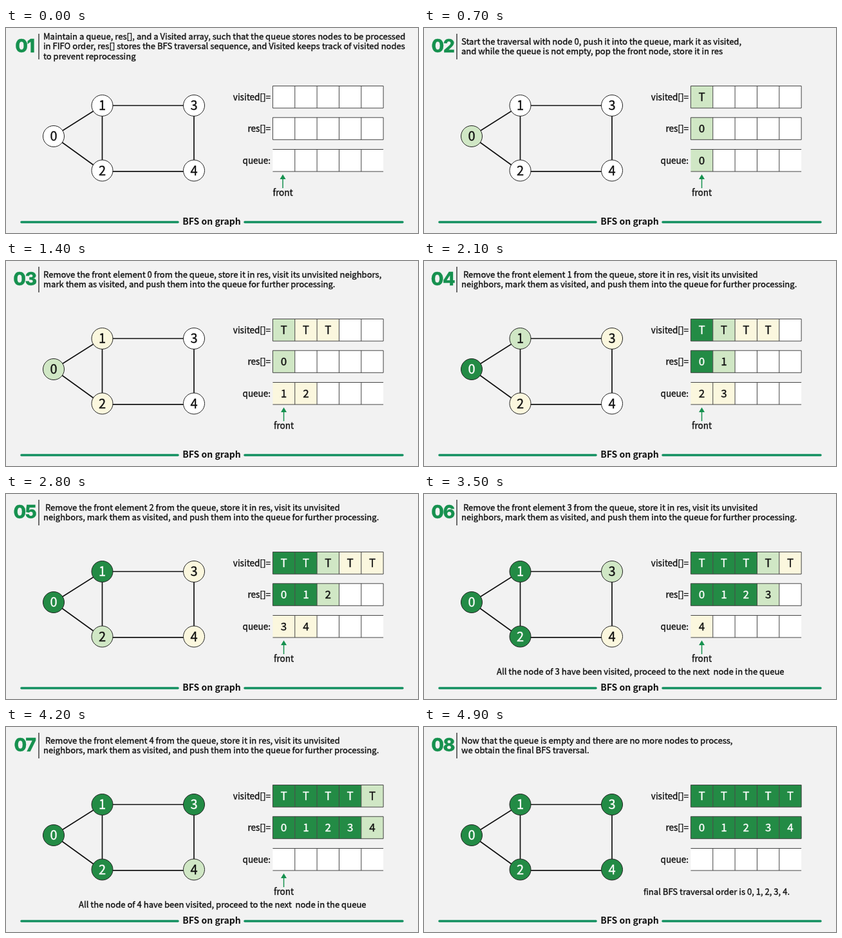
Write an HTML page that moves like this. It is 640x320 px and loops after 5.6 s.

```html
<!DOCTYPE html>
<html lang="en">
<head>
<meta charset="utf-8">
<title>BFS on graph</title>
<style>
  html, body { margin: 0; width: 100%; height: 100%; overflow: hidden; background: #f2f2f2; }
  svg { display: block; width: 640px; height: 320px; }
  text {
    font: 500 13.07px "Noto Sans CJK SC", "Noto Sans CJK JP", "Noto Sans", sans-serif;
    color: #111; fill: currentColor; stroke: currentColor; stroke-width: .35px; white-space: pre;
  }
  .step { font: 800 28.5px Inter, sans-serif; letter-spacing: -1.5px; color: #16914f; }
  .name { font-size: 13.5px; }
  .num { font-size: 20px; }
  .cell { font-size: 17px; }
  .title { font-size: 14px; font-weight: 700; stroke: none; }
  .done { color: #fff; }
</style>
</head>
<body>
<svg id="stage" viewBox="0 0 640 320"></svg>
<script>
const STEP_MS = 700, CELL = 34.35, LEFT = 414.4, HEIGHT = 34.5;
const INK = '#222', RULE = '#444', GREEN = '#16914f';
const FILL = { none: '#fff', seen: '#fbf7de', current: '#d0e7c5', done: '#238b45' };
const NODES = [[74, 169], [149.5, 121], [149.5, 222.5], [292, 121], [292, 222.5]];
const EDGES = 'M74 169L149.5 121V223.8ZM149.5 121H292V223.8H149.5';

const remove = n => [
  ` Remove the front element ${n} from the queue, store it in res, visit its unvisited`,
  'neighbors, mark them as visited, and push them into the queue for further processing.'];
const allVisited = n => `All the node of ${n} have been visited, proceed to the next  node in the queue`;

// current: node being processed; seen: how many nodes are marked visited
const STEPS = [
  { current: -1, seen: 0, lines: [
    'Maintain a queue, res[], and a Visited array, such that the queue stores nodes to be processed',
    'in FIFO order, res[] stores the BFS traversal sequence, and Visited keeps track of visited nodes',
    'to prevent reprocessing'] },
  { current: 0, seen: 1, queue: [0], lines: [
    'Start the traversal with node 0, push it into the queue, mark it as visited,',
    'and while the queue is not empty, pop the front node, store it in res'] },
  { current: 0, seen: 3, lines: [
    'Remove the front element 0 from the queue, store it in res, visit its unvisited neighbors,',
    'mark them as visited, and push them into the queue for further processing.'] },
  { current: 1, seen: 4, lines: remove(1) },
  { current: 2, seen: 5, lines: remove(2) },
  { current: 3, seen: 5, lines: remove(3), note: allVisited(3) },
  { current: 4, seen: 5, lines: remove(4), note: allVisited(4) },
  { current: 5, seen: 5, lines: [
    'Now that the queue is empty and there are no more nodes to process,',
    'we obtain the final BFS traversal.'] }
];

const text = (x, y, s, cls = '', anchor = 'start') =>
  `<text x="${x}" y="${y}" class="${cls}" text-anchor="${anchor}">${s}</text>`;
const label = (x, y, s, cls) => text(x, y, s, cls, 'middle');
const path = (d, color = RULE, width = 1, cap = 'butt') =>
  `<path d="${d}" fill="none" stroke="${color}" stroke-width="${width}" stroke-linecap="${cap}"/>`;

function row(y, name, cells, open) {
  let out = text(411, y + 22, name, 'name', 'end');
  for (let i = 0; i < 5; i++) {
    const [s, state] = cells[i] || ['', 'none'], x = LEFT + i * CELL;
    out += `<rect x="${x}" y="${y}" width="${CELL}" height="${HEIGHT}" fill="${FILL[state]}"/>`;
    out += label(x + CELL / 2, y + 23.3, s, 'cell ' + state);
  }
  for (let i = open ? 1 : 0; i <= (open ? 4 : 5); i++)
    out += path(`M${LEFT + i * CELL} ${y}v${HEIGHT}`);
  return out + path(`M${LEFT} ${y}h${5 * CELL}m0 ${HEIGHT}h${-5 * CELL}`);
}

function scene(index) {
  const { current, seen, lines, note, queue } = STEPS[index];
  const state = i => i < current ? 'done' : i === current ? 'current' : i < seen ? 'seen' : 'none';
  const ids = [0, 1, 2, 3, 4];
  const cells = list => list.map(i => [i, state(i)]);
  const waiting = queue || ids.slice(current + 1, seen);
  const top = lines.length > 2 ? 18 : 25.6;

  let out = label(29, 38, '0' + (index + 1), 'step') + path('M51 9V49', INK, 1.3);
  lines.forEach((s, i) => out += text(58, top + i * 15.4, s));

  out += path(EDGES, '#111', 1.7);
  NODES.forEach(([x, y], i) => {
    out += `<circle cx="${x}" cy="${y}" r="16.5" fill="${FILL[state(i)]}" stroke="${INK}"/>`;
    out += label(x, y + 7.2, i, 'num ' + state(i));
  });

  out += row(90.5, 'visited[]=', ids.slice(0, seen).map(i => ['T', state(i)]));
  out += row(139.8, 'res[]=', cells(ids.slice(0, current + 1)));
  out += row(189.5, 'queue:', cells(waiting), true);

  if (index < 7) {
    const x = index ? 431.5 : 430;
    out += path(`M${x} 250V232`, GREEN, 1.5);
    out += `<path d="M${x - 4.5} 236l4.5 -7.5l4.5 7.5Z" fill="${GREEN}"/>`;
    out += label(x, 262, 'front', 'name');
  } else {
    out += text(341, 261.5, 'final BFS traversal order is 0, 1, 2, 3, 4.');
  }
  if (note) out += text(113, 281.5, note);

  return out + path('M24 303H267M371 303H616', '#129060', 3.6, 'round') +
    label(319.5, 307, 'BFS on graph', 'title');
}

const stage = document.getElementById('stage');
let shown = -1;
function tick() {
  const index = Math.floor(performance.now() / STEP_MS) % STEPS.length;
  if (index !== shown) stage.innerHTML = scene(shown = index);
  requestAnimationFrame(tick);
}
tick();
</script>
</body>
</html>
```
